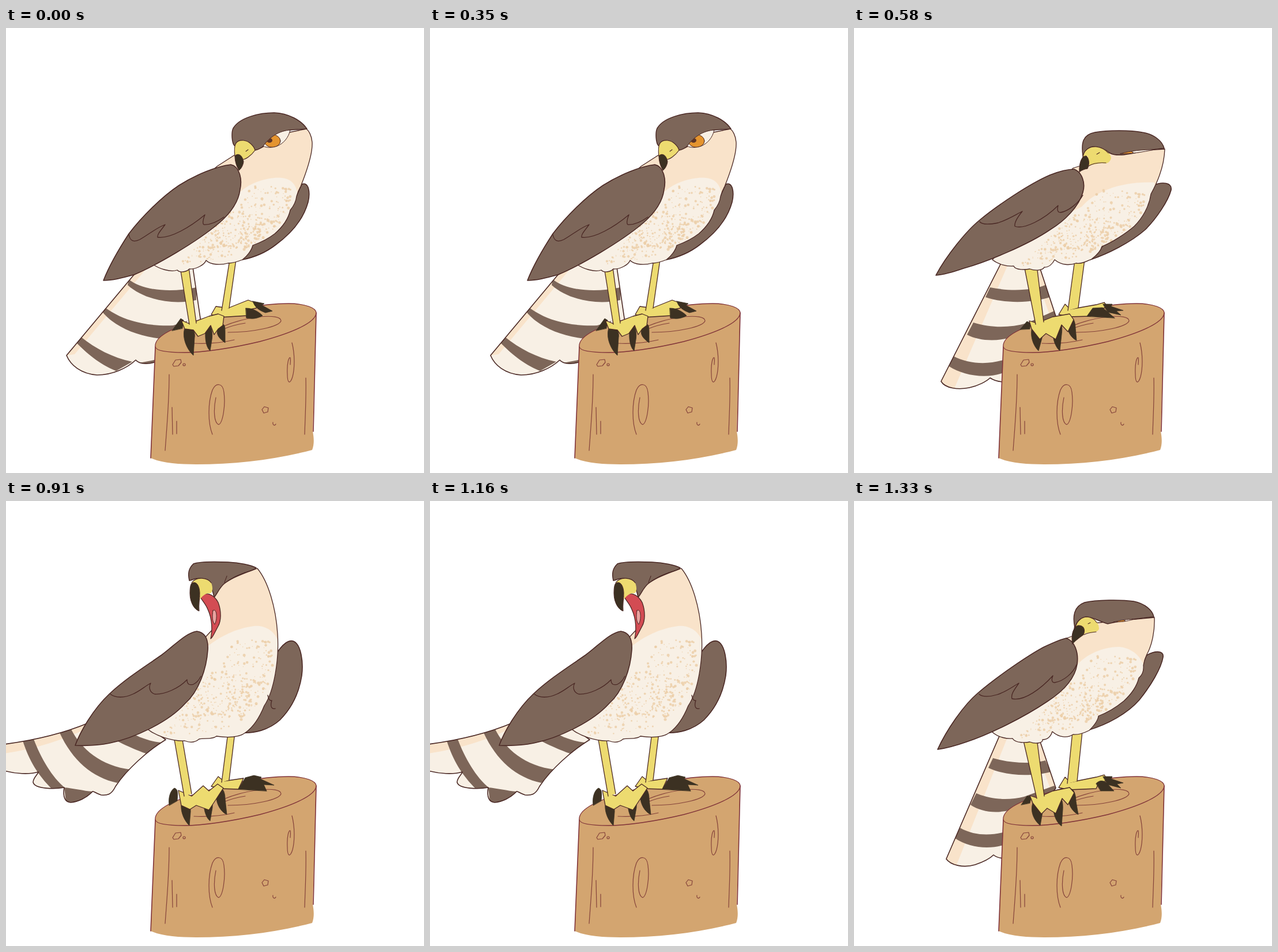
Recreate the animation shown at these times as an HTML page. Size 725 by 772 pixels, loop 1.58 s.

```html
<!DOCTYPE html>
<html lang="en">
<head>
<meta charset="utf-8">
<title>Hawk on a stump</title>
<style>
html, body { margin: 0; width: 100%; height: 100%; overflow: hidden; background: #fff; }
svg { display: block; width: 100%; height: 100%; }
</style>
</head>
<body>
<svg id="stage" viewBox="0 0 725 772" fill="none" stroke-linejoin="round" stroke-linecap="round"></svg>
<script>
const INK = '#4a2824', BROWN = '#7d6659', CREAM = '#f8f0e5', PEACH = '#f9e3ca';
const YELLOW = '#eddb70', CLAW = '#3c3122', WOOD = '#d3a570', BARK = '#84423a', RIM = '#7f3238';

const poses = [
  {
    hold: 580,
    tail: 'M222 428L105 568C112 585 130 600 158 602C185 602 210 590 225 576C232 584 250 584 262 578L338 510L324 415L255 410Z',
    edge: 'M222 428L105 568L119 566L243 418Z',
    stripes: 'M213 436C235 455 285 460 330 450V472C290 481 240 472 211 446ZM172 485C200 506 240 518 290 516L315 508L290 540C240 540 190 522 166 491ZM130 536C155 556 185 572 219 579L191 595C160 582 140 564 121 545ZM231 581L262 575V590Z',
    farWing: 'M513 271C525 266 528 285 524 302C515 335 490 360 468 376C450 390 430 398 410 402L430 370L495 310Z',
    body: 'M397 220L366 240L300 300L252 408C265 418 285 424 297 420C303 426 315 422 318 418C330 419 345 410 347 403C355 412 375 411 385 408C395 408 405 404 410 402C418 396 426 386 428 377C445 371 457 364 466 357C481 344 490 330 493 316C498 310 503 301 504 292C506 285 508 280 511 275C525 240 532 215 531 198C530 186 525 178 521 175L400 200Z',
    breast: 'M380 300L408 283C425 268 455 258 478 260C498 262 504 275 506 290L540 450H200V350Z',
    quad: [300, 412, 395, 395, 500, 275, 430, 272],
    wing: 'M390 237C405 240 410 262 406 280C403 305 385 325 370 338C330 372 260 412 222 428C200 434 185 438 169 438C180 410 198 380 213 357C235 328 270 293 300 273C330 254 365 240 390 237Z',
    feather: 'M213 358C215 370 222 372 232 367C248 358 260 347 276 341C268 352 262 358 263 363C285 366 320 345 345 324C341 333 341 340 343 341C355 342 368 335 378 328',
    cap: 'M397 205C391 200 391 180 394 174C405 155 440 147 465 147C490 148 512 160 522 175C512 176 503 176 493 177C475 179 456 190 446 206C440 209 436 212 431 212C425 200 410 190 397 205Z',
    beak: 'M397 222C394 200 400 194 412 195C422 196 430 205 432 212C425 222 415 228 411 228C408 220 402 218 397 222Z',
    tip: 'M397 222C402 216 410 220 412 232C411 240 406 246 404 247C400 240 397 232 397 222Z',
    lines: 'M416 214L420 211M397 222C394 200 400 194 412 195C422 196 430 205 432 212C425 222 415 228 411 228',
    eye: 'M446 205C458 188 475 178 493 177C490 190 482 200 470 205C462 208 452 208 446 205Z',
    iris: [462, 196, 14, 11],
    legs: ['M318 514L302 415H317L330 512', 'M374 490L388 402H399L387 486'],
    feet: ['M304 507L318 513L352 500L368 496L378 500L376 516L368 522L361 532L355 516L345 530L333 535L325 524L310 522Z',
           'M356 497L364 483L385 486L420 472L436 478L434 486L418 489L418 499L370 502Z'],
    claws: ['M416 486C430 486 440 494 445 499C435 505 425 505 417 503ZM428 474L448 478L444 481L462 491L450 494C440 490 432 486 428 474Z',
            'M288 525L303 504L308 507L306 521ZM312 516C322 514 329 527 327 537L325 568C312 556 303 532 312 516ZM348 516C357 512 359 530 357 541L354 560C345 552 344 530 348 516ZM369 518C378 510 380 514 380 527V546C369 538 362 530 369 518Z']
  },
  {
    hold: 330,
    tail: 'M255 408L151 613C158 625 180 628 200 624C215 621 230 613 236 607C245 613 255 614 262 614L350 500L322 415Z',
    edge: 'M255 408L151 613L172 630L268 408ZM322 415L352 500H340L310 415Z',
    stripes: 'M236 450C270 457 310 456 334 445L342 466C310 478 260 478 228 467ZM207 511C240 521 270 520 300 512L347 491L352 499L290 530C260 545 220 545 196 532ZM172 569C200 584 235 584 262 575V597C230 610 190 603 165 587Z',
    farWing: 'M519 273C535 266 552 268 550 281C545 300 525 330 505 350C480 372 440 392 410 402L430 380L510 300Z',
    body: 'M393 239L380 243L240 402C250 410 265 414 277 413C280 421 300 419 305 418C315 422 328 420 330 415C338 416 345 408 348 402C360 412 375 412 385 408C395 410 405 404 412 401C420 395 428 387 430 379C448 372 472 356 486 344C500 330 512 310 515 288C525 270 538 240 539 210L398 220Z',
    breast: 'M375 320L395 310C420 282 465 266 521 268L550 450H200V350Z',
    quad: [285, 415, 390, 398, 512, 285, 430, 278],
    wing: 'M382 245C395 250 402 268 397 285C390 310 365 335 340 350C302 376 230 406 190 417C170 424 155 428 142 429C160 395 195 352 217 334C248 308 305 270 340 255C355 249 370 245 382 245Z',
    feather: 'M218 336C222 341 235 341 250 338C268 332 280 324 292 318C282 330 278 338 279 344C295 350 330 332 354 308C352 315 353 320 358 320C372 318 390 303 397 290',
    cap: 'M397 222C394 200 396 185 418 181C440 177 480 177 500 181C520 184 535 196 538 209C520 209 495 216 468 220C455 221 449 220 444 217C436 211 425 205 415 206C405 207 400 214 397 222Z',
    beak: 'M397 225C398 212 408 205 420 206C435 208 446 218 446 226C443 235 437 236 430 234C420 236 408 238 402 240L406 222Z',
    tip: 'M391 250C390 232 396 221 403 222C409 228 408 238 405 244C398 245 393 248 391 250Z',
    lines: 'M406 240C415 234 425 233 437 234M421 219L426 216M397 225C398 212 408 205 420 206C428 207 436 211 441 217',
    eye: 'M462 218C480 213 500 211 522 211C500 215 480 219 462 218Z',
    iris: [474, 216, 10, 3],
    legs: ['M315 514L295 412H317L329 510', 'M371 490L383 402H400L389 485'],
    feet: ['M304 508L317 512L345 501L374 496L381 506L371 527L360 515L350 540L333 530L322 540L308 522Z',
           'M355 497L366 479L375 488L420 480L434 476L440 484L418 490L410 500L372 501Z'],
    claws: ['M404 500L414 486L431 485L452 503ZM432 479L448 479L446 483L467 490L455 491L463 498L440 493Z',
            'M288 523L300 509L306 512L305 522ZM311 513C322 510 330 528 326 538L320 560C308 548 304 528 311 513ZM350 503C360 500 362 518 360 532L357 560C345 550 340 522 350 503ZM371 501C381 498 384 512 384 520L386 542C373 536 366 518 371 501Z']
  },
  {
    hold: 420,
    tail: 'M-3 422C50 415 100 403 143 385L250 395L277 414C245 434 210 465 190 495C183 510 175 511 165 510C155 507 152 503 150 504C140 515 125 522 112 523C103 522 98 515 101 497C85 500 50 500 47 488C47 480 55 475 56 470C40 475 15 473 -3 468Z',
    edge: 'M-3 421C50 415 100 403 143 385L150 390C100 415 50 430 -3 438Z',
    stripes: 'M29 416L48 413C60 445 80 480 103 498L80 500C55 475 40 450 29 416ZM93 402L113 396C130 430 165 460 217 466L193 489C150 480 115 450 93 402ZM188 414C215 428 240 438 250 440L272 419C250 418 225 408 215 400ZM101 497C115 498 135 503 150 504C135 520 115 526 104 522Z',
    farWing: 'M471 262C480 248 490 241 498 243C512 248 516 280 513 303C508 335 495 360 475 380C455 398 430 403 410 402L440 360Z',
    body: 'M436 117C455 140 468 185 471 230C474 275 465 330 448 355C438 380 425 395 415 402C405 410 385 411 365 408C358 414 345 411 335 413C328 419 320 420 310 416C290 417 255 408 240 390L300 300L347 235L370 210L360 160C375 140 400 130 436 117Z',
    breast: 'M330 265L350 252C370 236 398 221 430 217C450 215 466 226 472 243L480 450H200V350Z',
    quad: [268, 410, 395, 394, 462, 238, 400, 240],
    wing: 'M331 226C345 228 351 240 350 258C348 290 335 330 310 352C280 385 220 412 180 420C160 424 140 425 120 424C128 402 150 362 180 334C208 308 240 288 270 267C295 248 312 229 331 226Z',
    feather: 'M181 335C190 342 205 342 220 335C232 330 240 322 251 316C247 323 249 332 258 335C275 336 300 325 314 310C314 318 318 320 325 318C332 315 336 308 338 304M454 337C456 345 458 347 461 346C458 355 460 362 467 360',
    cap: 'M318 138C315 125 317 117 325 109C335 105 360 105 385 106C405 107 425 111 434 116C432 119 425 121 415 124C400 130 390 134 379 143C370 150 366 162 361 167C358 150 350 138 340 135C328 132 322 138 318 138Z',
    beak: 'M322 142C330 130 350 133 356 142C360 152 358 162 352 160C345 160 337 168 336 172C338 155 330 142 322 142Z',
    tip: 'M322 143C330 137 336 148 336 160C336 170 334 180 335 191C326 188 319 175 319 160C319 150 320 145 322 143Z',
    lines: 'M379 142C380 136 383 132 383 130M322 142C330 130 350 133 356 142',
    mouth: 'M336 165C347 157 360 161 368 176C374 192 373 208 368 217C362 228 358 238 355 239C358 225 358 205 350 188C346 178 340 173 336 165Z',
    tongue: 'M359 190C366 185 367 205 362 214C358 210 357 200 359 190Z',
    legs: ['M309 512L292 414H306L322 508', 'M374 488L385 402H397L387 484'],
    feet: ['M299 502L322 512L342 494L352 503L367 491L377 498L364 518L352 536L330 528L319 535L304 528Z',
           'M356 495L368 478L378 486L412 481L403 500L372 499Z'],
    claws: ['M403 500L415 480L430 476L443 479L441 482L465 493L447 492L452 503Z',
            'M283 528C281 515 285 502 292 498C299 500 298 508 297 520ZM305 519C315 515 321 530 320 540L318 563C307 552 301 535 305 519ZM347 506C358 500 359 518 358 532L354 555C344 548 339 520 347 506ZM367 499C377 494 380 508 380 516L383 544C370 538 360 518 367 499Z']
  },
  {
    hold: 250,
    tail: 'M252 408L160 621C168 632 190 637 210 631C225 626 237 619 242 614C248 619 255 620 262 620L350 498L322 415Z',
    edge: 'M252 408L160 621L176 636L267 408ZM322 415L352 498H340L310 415Z',
    stripes: 'M241 446C275 456 310 456 332 450L341 470C310 478 265 478 233 463ZM212 507C240 519 270 519 295 513L347 494L352 500L290 530C260 543 225 543 202 527ZM184 567C210 582 240 580 262 574V596C235 605 200 602 175 585Z',
    farWing: 'M507 268C520 260 538 258 536 271C533 290 515 320 495 345C475 368 440 388 405 398L425 370L495 300Z',
    body: 'M380 234L360 241L240 401C250 410 265 413 275 412C280 421 300 419 305 418C315 422 328 420 327 414C338 414 342 406 344 400C355 410 370 412 380 405C390 406 400 402 408 398C415 391 423 382 424 373C440 367 457 356 468 347C482 334 491 320 494 307C500 302 503 295 502 285C503 278 505 272 508 266C517 250 522 225 521 202L383 215Z',
    breast: 'M370 300L387 285C400 268 430 253 460 253C482 255 500 270 504 292L530 450H200V350Z',
    quad: [283, 414, 384, 394, 496, 270, 420, 266],
    wing: 'M368 238C382 242 390 262 387 283C383 310 360 332 335 348C295 375 235 405 195 418C175 425 160 429 145 431C160 398 190 354 215 333C250 303 305 266 330 253C345 246 358 240 368 238Z',
    feather: 'M217 335C222 340 235 340 248 336C264 331 275 322 286 316C276 330 272 336 274 343C295 348 325 325 345 303C342 310 343 315 348 315C365 312 380 298 386 284',
    cap: 'M383 220C379 200 381 183 400 176C420 171 465 171 485 174C505 178 518 190 520 201C500 203 470 206 440 213C428 210 412 200 402 201C392 203 386 210 383 220Z',
    beak: 'M384 220C386 208 395 201 405 201C418 203 425 212 425 222C422 229 412 228 402 229L395 235L390 220Z',
    tip: 'M379 248C376 232 380 220 388 216C398 215 402 222 398 232C390 238 383 243 379 248Z',
    lines: 'M399 232C406 228 413 228 420 227M406 213L410 211M384 220C386 208 395 201 405 201C412 202 418 206 421 211',
    eye: 'M450 210C462 207 475 205 484 205C475 209 462 210 450 210Z',
    iris: [462, 208, 8, 2.5],
    legs: ['M317 516L293 412H317L330 512', 'M370 490L379 400H396L387 486'],
    feet: ['M305 511L317 515L345 503L374 497L382 506L371 527L361 516L350 542L335 533L325 543L310 524Z',
           'M355 497L366 479L375 488L420 479L434 475L440 484L424 490L420 499L372 501Z'],
    claws: ['M420 490C425 485 430 484 437 488L451 503L428 503ZM432 478L448 478L446 482L467 489L456 491L463 498L440 492Z',
            'M290 527L300 512L308 512L305 524ZM312 519C323 515 330 530 327 540L323 563C310 552 304 535 312 519ZM350 513C360 508 363 522 362 536L360 564C347 555 341 530 350 513ZM373 500C382 496 385 512 385 521L389 544C375 537 367 518 373 500Z']
  }
];

const path = (d, fill = 'none', ink = INK, w = 1.3) =>
  d ? `<path d="${d}" fill="${fill}" stroke="${ink}" stroke-width="${w}"/>` : '';
const flat = (d, fill) => path(d, fill, 'none');
const clip = (id, d, inner) =>
  `<clipPath id="${id}"><path d="${d}"/></clipPath><g clip-path="url(#${id})">${inner}</g>`;

function stump() {
  const grain = 'M440 501C462 499 477 501 477 508C474 518 430 528 385 528M440 501C415 504 395 510 378 517M378 522C390 517 402 514 415 512M326 547C350 548 375 546 396 541'
    + 'M283 601C283 650 279 690 276 733M288 658L289 705M296 682V704M520 607C521 640 519 670 518 705';
  const knots = 'M289 584L294 576L303 575L304 580L299 586L291 587ZM307 584a2 2 0 1 0 4 0a2 2 0 1 0 -4 0'
    + 'M358 705C350 685 350 650 358 628C364 615 376 615 378 632C381 655 376 685 369 688C360 685 360 660 364 641'
    + 'M496 546C501 565 501 590 497 605C493 618 488 618 488 600C487 580 491 570 493 572C494 576 493 580 493 584'
    + 'M444 662L448 657L455 659L454 666L447 668ZM463 684C462 690 467 690 468 687';
  return flat('M259 553L251 746C270 755 300 757 330 757C400 757 470 748 531 732C535 722 534 710 532 700L538 494Z', WOOD)
    + path('M259 553L251 746M538 494L533 700', 'none', RIM, 1.6)
    + path('M259 553C257 535 290 520 330 508C390 490 440 478 490 478C520 478 538 486 538 494C538 510 500 528 440 544C390 556 340 563 310 563C280 563 260 560 259 553Z', WOOD, RIM)
    + path(grain + knots, 'none', BARK, 1.2);
}

// Scatter dots over a quad that follows the breast.
function speckles([ax, ay, bx, by, cx, cy, dx, dy]) {
  let seed = 7, out = '';
  const rnd = () => (seed = seed * 16807 % 2147483647) / 2147483647;
  for (let i = 0; i < 380; i++) {
    const v = rnd() < .7 ? rnd() : .15 + .45 * rnd(), u = rnd();
    const bulge = 24 * Math.sin(Math.PI * v) * u;
    const x = (1 - v) * (ax + (bx - ax) * u) + v * (dx + (cx - dx) * u) + bulge;
    const y = (1 - v) * (ay + (by - ay) * u) + v * (dy + (cy - dy) * u) + bulge * .3;
    const r = .7 + 1.8 * rnd() ** 1.6;
    out += `<circle cx="${x.toFixed(1)}" cy="${y.toFixed(1)}" r="${r.toFixed(1)}"/>`;
  }
  return `<g fill="#edcfaa" fill-opacity=".85">${out}</g>`;
}

function eye(p, i) {
  if (!p.eye) return '';
  const [x, y, rx, ry] = p.iris;
  const pupil = i ? '' : '<ellipse cx="457" cy="195" rx="5" ry="4" fill="#5c3426"/>';
  return flat(p.eye, CREAM)
    + clip('eye' + i, p.eye, `<ellipse cx="${x}" cy="${y}" rx="${rx}" ry="${ry}" fill="#e4942f" stroke="${INK}"/>` + pupil)
    + path(p.eye, 'none', INK, 1);
}

function bird(p, i) {
  const leg = k => path(p.feet[k], YELLOW) + path(p.legs[k], YELLOW)
    + path(p.claws[k], CLAW, CLAW, .8);
  return flat(p.tail, CREAM)
    + clip('tail' + i, p.tail, flat(p.edge, PEACH) + flat(p.stripes, BROWN))
    + path(p.tail, 'none', INK, 1.6)
    + stump()
    + path(p.farWing, BROWN, INK, 1.6)
    + leg(1) + leg(0)
    + flat(p.body, PEACH)
    + clip('body' + i, p.body, flat(p.breast, CREAM) + speckles(p.quad))
    + path(p.body)
    + path(p.wing, BROWN, INK, 1.6) + path(p.feather)
    + path(p.cap, BROWN, INK, 1.5)
    + eye(p, i)
    + path(p.mouth, '#d34c53') + path(p.tongue, '#eaa3a0', INK, 1)
    + flat(p.beak, YELLOW) + path(p.tip, CLAW, INK, 1)
    + path(p.lines, 'none', INK, 1.1);
}

const stage = document.getElementById('stage');
stage.innerHTML = poses.map((p, i) => `<g visibility="hidden">${bird(p, i)}</g>`).join('');
const groups = [...stage.children];
const loop = poses.reduce((sum, p) => sum + p.hold, 0);
let shown = -1;

function draw(ms) {
  let t = ms % loop, k = 0;
  while (t >= poses[k].hold) t -= poses[k++].hold;
  if (k === shown) return;
  groups.forEach((g, i) => g.setAttribute('visibility', i === k ? 'visible' : 'hidden'));
  shown = k;
}

const start = performance.now();
function tick() {
  draw(performance.now() - start);
  requestAnimationFrame(tick);
}
tick();
</script>
</body>
</html>
```
